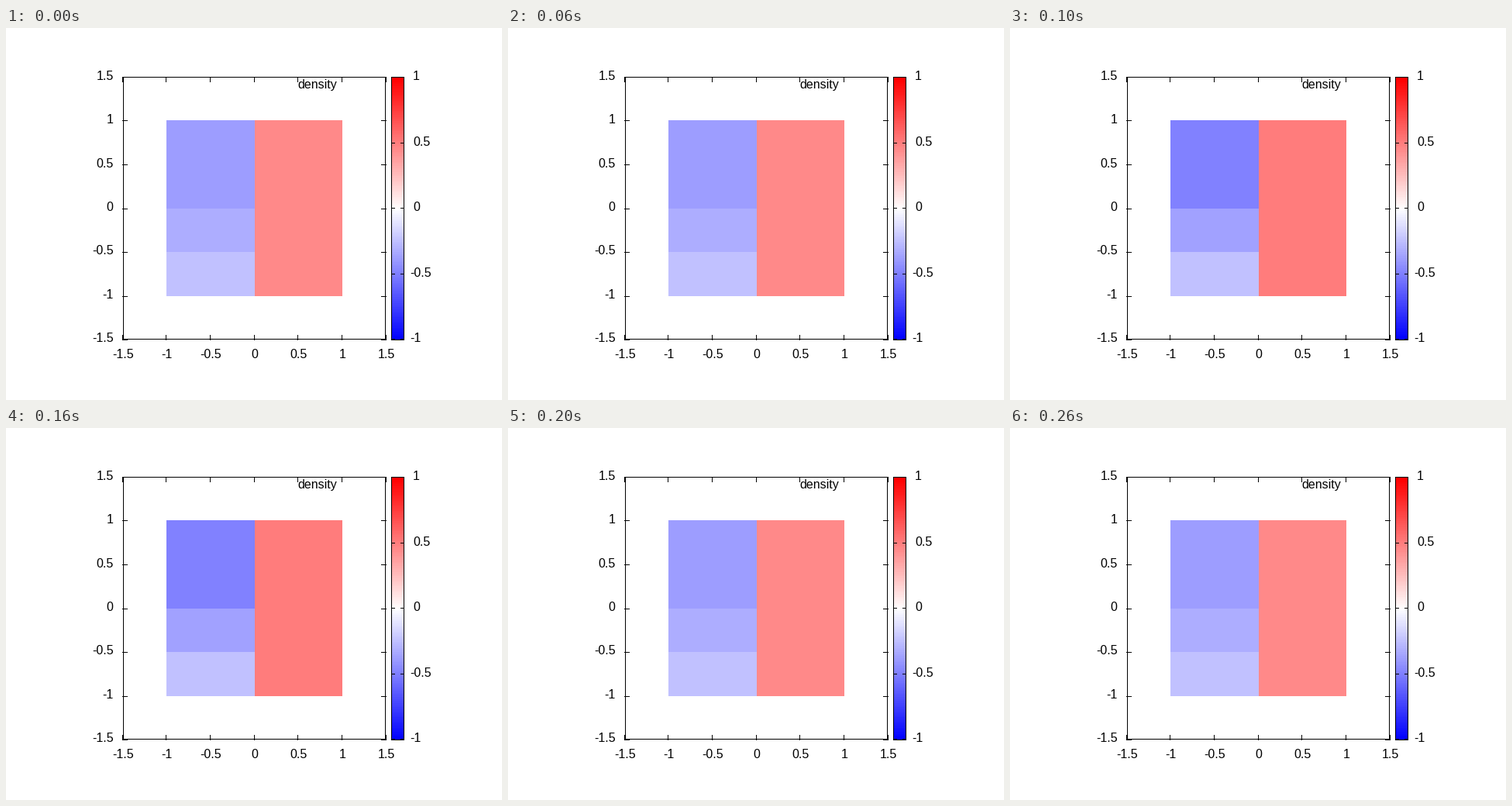
A matplotlib script for the animation above (300 ms loop, 640 px wide and 480 px high).

```python
import math

import numpy as np
import matplotlib.pyplot as plt
from matplotlib.animation import FuncAnimation
from matplotlib.patches import Rectangle

W, H, DPI = 640, 480, 100
LEFT, RIGHT, TOP, BOTTOM = 151, 489, 63, 401
BAR_L, BAR_R = 497, 513
TICK = 7
LEVELS = 128

plt.rcParams["font.family"] = "Liberation Sans"
plt.rcParams["font.size"] = 16 * 72 / DPI

fig = plt.figure(figsize=(W / DPI, H / DPI), dpi=DPI, facecolor="white")
ax = fig.add_axes([0, 0, 1, 1])
ax.set_xlim(0, W)
ax.set_ylim(H, 0)
ax.axis("off")


def diverging(v):
    """Blue for -1, white for 0, red for 1, in a limited number of levels."""
    level = min(int((v + 1) / 2 * LEVELS), LEVELS - 1)
    v = level / (LEVELS - 1) * 2 - 1
    fade = 1 - abs(v)
    return (1, fade, fade) if v > 0 else (fade, fade, 1)


def box(x0, y0, x1, y1, color="black", z=3):
    """Fill the pixels from (x0, y0) up to, not including, (x1, y1)."""
    patch = Rectangle((x0, y0), x1 - x0, y1 - y0, facecolor=color,
                      linewidth=0, antialiased=False, zorder=z)
    return ax.add_patch(patch)


def outline(x0, y0, x1, y1):
    box(x0, y0, x1 + 1, y0 + 1)
    box(x0, y1, x1 + 1, y1 + 1)
    box(x0, y0, x0 + 1, y1 + 1)
    box(x1, y0, x1 + 1, y1 + 1)


def label(x, y, text, ha):
    ax.text(x, y, text, ha=ha, va="baseline", color="black", zorder=4)


def to_x(v):
    return math.floor(320.05 + v * 340 / 3)


def to_y(v):
    return math.floor(233.05 - v * 339.5 / 3)


# Plot frame with mirrored inward ticks
outline(LEFT, TOP, RIGHT, BOTTOM)
x_min, x_max = to_x(-1.5), to_x(1.5)
y_min, y_max = to_y(1.5), to_y(-1.5)
for v in np.arange(-1.5, 1.6, 0.5):
    x, y = to_x(v), to_y(v)
    box(x, y_min, x + 1, y_min + TICK)
    box(x, y_max + 1 - TICK, x + 1, y_max + 1)
    box(x_min, y, x_min + TICK, y + 1)
    box(x_max + 1 - TICK, y, x_max + 1, y + 1)
    label(320.7 + v * 340 / 3, 426, f"{v:g}", "center")
    label(138.5, round(232 - v * 338 / 3) + 4, f"{v:g}", "right")
label(376.5, 78, "density", "left")

# Colour bar
values = np.linspace(1, -1, BOTTOM - TOP + 1)
ax.imshow([[diverging(v)] for v in values], aspect="auto",
          interpolation="nearest", zorder=1,
          extent=(BAR_L, BAR_R + 1, BOTTOM + 2, TOP + 1))
outline(BAR_L, TOP, BAR_R, BOTTOM + 1)
for v in np.arange(-1, 1.1, 0.5):
    y = math.ceil(232 - v * 169)
    box(BAR_L, y, BAR_L + 5, y + 1)
    box(BAR_R - 4, y, BAR_R + 1, y + 1)
    label(521 if v < 0 else 525, y + 4, f"{v:g}", "left")

upper = box(207, 119, 321, 233, z=2)
middle = box(207, 233, 321, 289, z=2)
lower = box(207, 289, 321, 346, z=2)
right = box(321, 119, 434, 346, z=2)
cells = (upper, middle, lower, right)

REST = (-0.39, -0.32, -0.25, 0.455)
PEAK = (-0.5, -0.375, -0.25, 0.5)


def update(i):
    for cell, v in zip(cells, PEAK if i % 3 == 1 else REST):
        cell.set_facecolor(diverging(v))
    return cells


anim = FuncAnimation(fig, update, frames=3, interval=100, repeat=True,
                     repeat_delay=0, blit=False)
plt.show()
```
